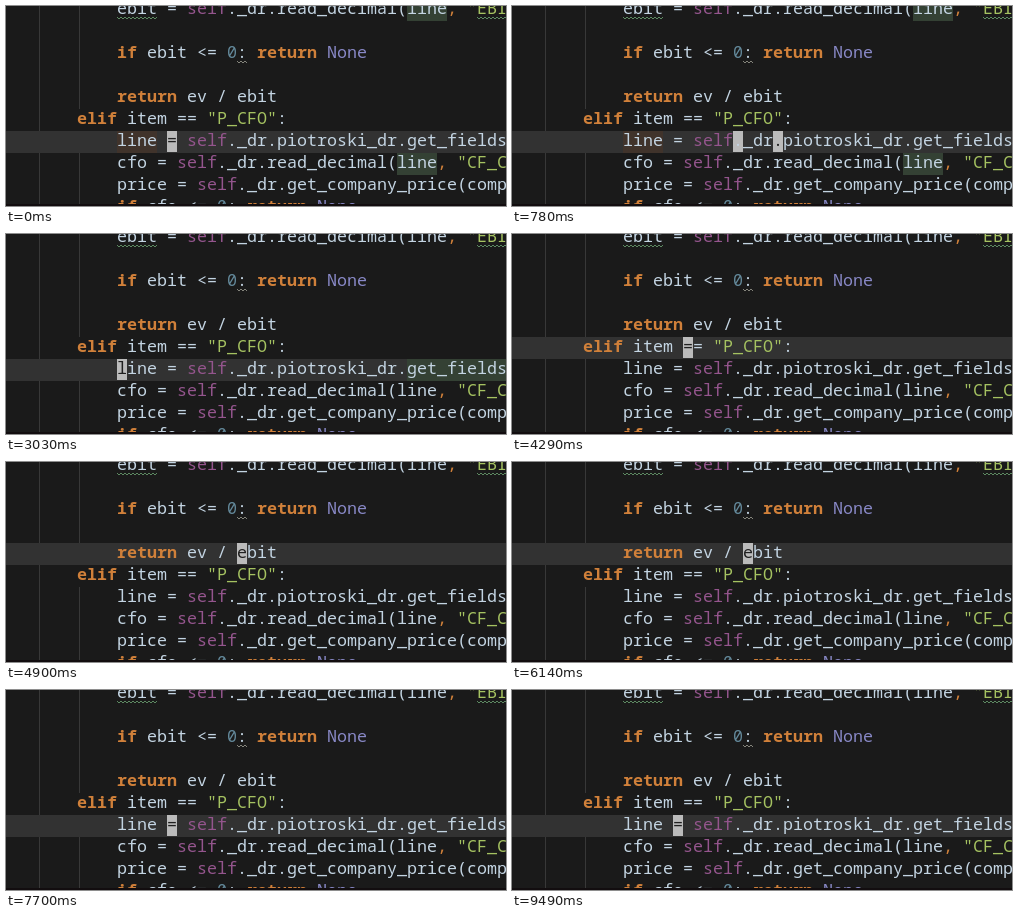
Recreate the animation shown at these times as an HTML page with a canvas. Size 500 by 200 pixels, loop 9640 ms.

```html
<!DOCTYPE html>
<html lang="en">
<head>
<meta charset="utf-8">
<title>Word motions in a code editor</title>
<style>
  html, body { margin: 0; width: 100%; height: 100%; overflow: hidden; background: #1a1a1a; }
  canvas { display: block; width: 500px; height: 200px; }
</style>
</head>
<body>
<canvas id="stage" width="500" height="200"></canvas>
<script>
const ctx = document.getElementById('stage').getContext('2d');
const LOOP = 9640, CELL = 10, ROW = 22, LEFT = 31, TOP = -7;
const FONT = '16.667px "Noto Sans Mono", "DejaVu Sans Mono", monospace';
const COLOR = {
  back: '#1a1a1a', caretRow: '#323232', guide: '#383838', cursor: '#bbbbbb', inverse: '#202020',
  text: '#c3d4e2', keyword: '#d0803a', self: '#94558d', string: '#a5c261', none: '#8888c6',
  number: '#648a9c', read: '#344134', write: '#40332b', typo: '#5d8a62', weak: '#85857c'
};
const LINES = [
  '        ebit = self._dr.read_decimal(line, "EBI',
  '',
  '        if ebit <= 0: return None',
  '',
  '        return ev / ebit',
  '    elif item == "P_CFO":',
  '        line = self._dr.piotroski_dr.get_fields',
  '        cfo = self._dr.read_decimal(line, "CF_C',
  '        price = self._dr.get_company_price(comp',
  '        if cfo <= 0: return None'
];

// Word starts that the cursor can jump between, in reading order
const words = [4, 5, 6].flatMap(row =>
  [...LINES[row].matchAll(/\w+|[^\w\s]+/g)].map(m => ({ row, col: m.index })));
const START = 11;
const FORWARD = [80, 270, 460, 650, 840, 1030, 1180];
const BACK = [1640, 1790, 2020, 2250, 2420, 2650, 2800, 3030, 3260,
  3890, 4060, 4290, 4520, 4670, 4900, 5130, 5300, 5530];
const RETURN = [5840, 5990, 6140, 6370, 6600, 6770, 6920, 7090, 7320, 7550, 7700];
const inSteps = (times, step) => times.map(time => ({ time, step }));
const moves = [...inSteps(FORWARD, 1), ...inSteps(BACK, -1), ...inSteps(RETURN, 1)];

const xOf = col => LEFT + col * CELL;
const yOf = row => TOP + row * ROW;

function fillCells(row, col, count, color, height = ROW) {
  ctx.fillStyle = color;
  ctx.fillRect(xOf(col), yOf(row), count * CELL, height);
}

function drawChars(text, row, col, color, bold) {
  ctx.font = (bold ? 'bold ' : '') + FONT;
  ctx.fillStyle = color;
  [...text].forEach((char, i) => ctx.fillText(char, xOf(col + i), yOf(row) + 15));
}

const isKeyword = token => /^(if|elif|return)$/.test(token);

function tokenColor(token) {
  if (isKeyword(token) || token === ',') return COLOR.keyword;
  if (token === 'self') return COLOR.self;
  if (token === 'None') return COLOR.none;
  if (token[0] === '"') return COLOR.string;
  return /^\d/.test(token) ? COLOR.number : COLOR.text;
}

function drawLine(text, row) {
  for (const m of text.matchAll(/"[^"]*"?|\w+|[^\w\s"]+/g)) {
    drawChars(m[0], row, m.index, tokenColor(m[0]), isKeyword(m[0]));
  }
}

function squiggle(row, col, count, color) {
  const y = yOf(row) + 18;
  ctx.strokeStyle = color;
  ctx.lineWidth = 1;
  ctx.beginPath();
  for (let x = 0; x <= count * CELL; x += 2) ctx.lineTo(xOf(col) + x, y + (x % 4 ? 2 : 0));
  ctx.stroke();
}

function cursorAt(time) {
  let index = START, previous = START;
  for (const move of moves) {
    if (move.time > time) break;
    previous = index;
    index += move.step;
  }
  return { index, previous };
}

// A one-cell word just left of the given word keeps its cursor background
function drawTrail(index, caretRow) {
  const left = words[index - 1], word = words[index];
  if (left && left.row === caretRow && word.row === caretRow && word.col - left.col === 1) {
    fillCells(left.row, left.col, 1, COLOR.cursor, ROW - 1);
  }
}

function draw(time) {
  const { index, previous } = cursorAt(time);
  const cursor = words[index];

  ctx.fillStyle = COLOR.back;
  ctx.fillRect(0, 0, 500, 200);
  ctx.fillStyle = COLOR.guide;
  ctx.fillRect(33, 0, 1, 200);
  ctx.fillRect(73, 0, 1, yOf(5));
  ctx.fillRect(73, yOf(6), 1, 200);
  ctx.fillStyle = COLOR.caretRow;
  ctx.fillRect(0, yOf(cursor.row), 500, ROW);

  // Usages of the last identifier the cursor rested on
  if (time < 1480) {
    fillCells(0, 37, 4, COLOR.read);
    fillCells(6, 8, 4, COLOR.write);
    fillCells(7, 36, 4, COLOR.read);
  } else if (time < 3570) {
    fillCells(6, 37, 10, COLOR.read);
  }

  drawTrail(index, cursor.row);
  drawTrail(previous, cursor.row);
  LINES.forEach(drawLine);
  squiggle(0, 8, 4, COLOR.typo);
  squiggle(0, 44, 3, COLOR.typo);
  squiggle(2, 20, 1, COLOR.weak);

  fillCells(cursor.row, cursor.col, 1, COLOR.cursor, ROW - 1);
  drawChars(LINES[cursor.row][cursor.col], cursor.row, cursor.col, COLOR.inverse);

  ctx.fillStyle = '#120d0f';
  ctx.fillRect(0, 198, 500, 2);
}

function frame() {
  draw(performance.now() % LOOP);
  requestAnimationFrame(frame);
}
frame();
</script>
</body>
</html>
```
